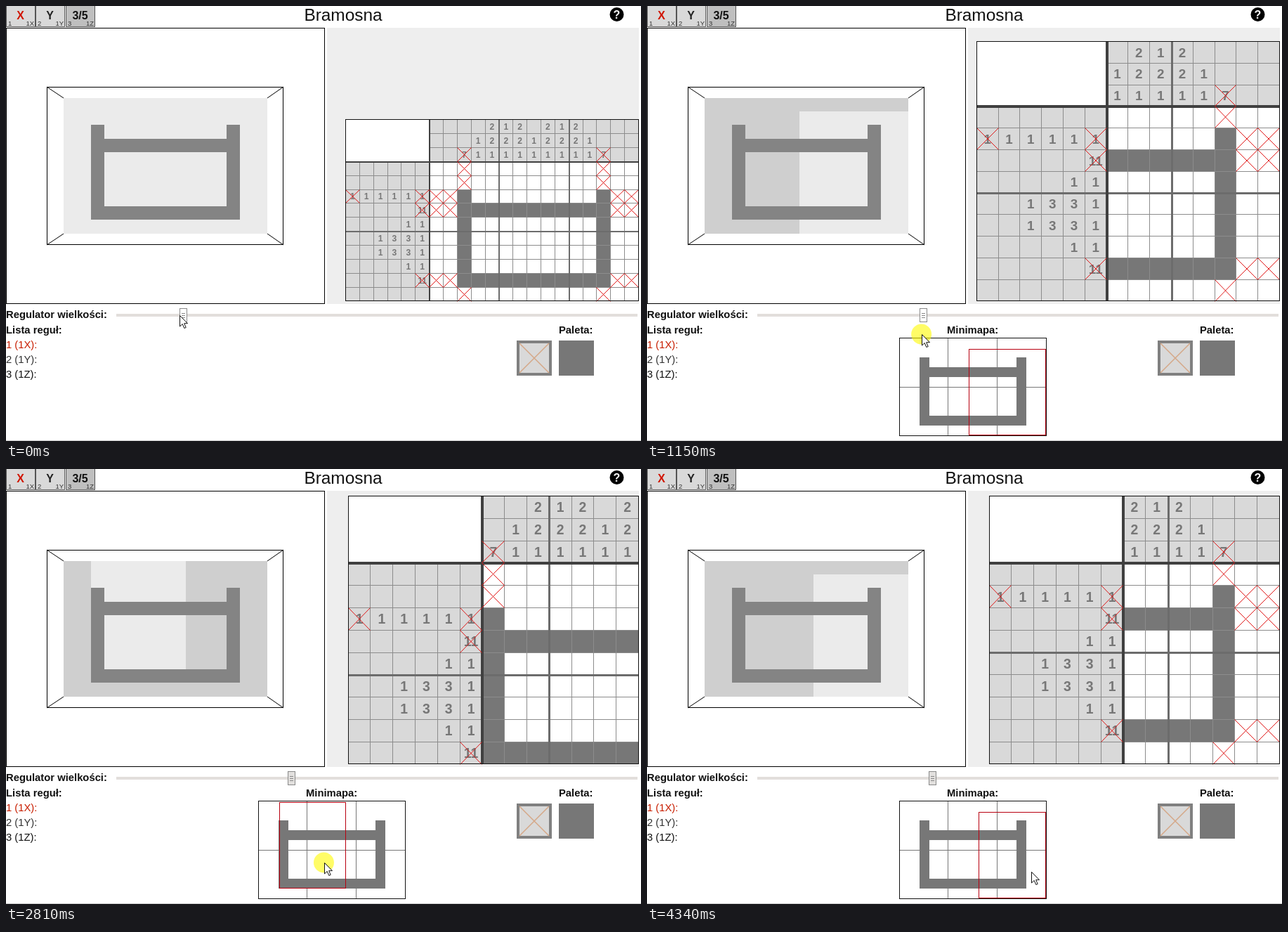
Write an HTML page with a canvas that moves like this. It is 904 by 619 pixels and loops after 4390 ms.

```html
<!DOCTYPE html>
<html lang="pl">
<head>
<meta charset="utf-8">
<title>Nonogram</title>
<style>
html, body { margin: 0; width: 100%; height: 100%; overflow: hidden; background: #fff; }
canvas { display: block; }
</style>
</head>
<body>
<canvas id="stage" width="904" height="619"></canvas>
<script>
const ctx = document.getElementById('stage').getContext('2d');
const LOOP = 4390, COLS = 15, ROWS = 10, SIDE = 6, HEAD = 3;
const RIGHT = 900.5, BOTTOM = 420;
const INK = '#777', CLUE = '#d9d9d9', RED = '#e01818', SIZE = 14.8;

const rowClues = ['', '', '1 1 1 1 1 1', '11', '1 1', '1 3 3 1', '1 3 3 1', '1 1', '11', '']
  .map(s => s ? s.split(' ') : []);
const colClues = ['', '', '7', '11', '221', '121', '221', '11', '221', '121', '221', '11', '7', '', '']
  .map(s => [...s]);

// time, pointer x, pointer y, slider thumb x
const path = [
  [0, 247, 440, 252], [90, 247, 440, 252], [600, 303, 447, 304], [840, 343, 455, 341.5],
  [1150, 391, 467, 393], [1240, 404, 471, 406], [1690, 552, 575, 406], [1870, 552, 575, 406],
  [2250, 514, 567, 406], [2380, 499, 559, 406], [2810, 453, 560, 406], [2940, 447, 560, 406],
  [3120, 434, 565, 406], [3400, 452, 587, 406], [3490, 462, 588, 406], [4060, 530, 575, 406],
  [4200, 547, 573, 406], [LOOP, 547, 573, 406]
];

const clamp = (v, lo, hi) => Math.max(lo, Math.min(hi, v));
const filled = (c, r) => r >= 2 && r <= 8 && c >= 2 && c <= 12 &&
  (c === 2 || c === 12 || r === 3 || r === 8);
const crossed = (c, r) => c === 2 || c === 12 ? r < 2 || r > 8
  : (c < 2 || c > 12) && [2, 3, 8].includes(r);

function poseAt(t) {
  const i = Math.max(1, path.findIndex(k => k[0] > t));
  const a = path[i - 1], b = path[i], f = (t - a[0]) / (b[0] - a[0]);
  return a.slice(1).map((v, j) => v + (b[j + 1] - v) * f);
}

function box(x, y, w, h, fill, edge) {
  if (fill) { ctx.fillStyle = fill; ctx.fillRect(x, y, w, h); }
  if (edge) { ctx.strokeStyle = edge; ctx.lineWidth = 1; ctx.strokeRect(x + .5, y + .5, w - 1, h - 1); }
}

function lines(color, width, ...segments) {
  ctx.strokeStyle = color;
  ctx.lineWidth = width;
  ctx.beginPath();
  for (const [x1, y1, x2, y2] of segments) { ctx.moveTo(x1, y1); ctx.lineTo(x2, y2); }
  ctx.stroke();
}

const cross = (x, y, w, h, color = RED, width = 1) =>
  lines(color, width, [x, y, x + w, y + h], [x + w, y, x, y + h]);

function text(str, x, y, size, color = '#111', weight = '', align = 'left') {
  ctx.font = `${weight} ${size}px "Liberation Sans", Arial, sans-serif`;
  ctx.textAlign = align;
  ctx.fillStyle = color;
  ctx.fillText(str, x, y);
}

const label = (str, x, y) => text(str, x, y, SIZE, '#111', 'bold');

// The solved cells as four bars
function shape(x, y, s, color) {
  const bars = [[2, 2, 1, 7], [12, 2, 1, 7], [2, 3, 11, 1], [2, 8, 11, 1]];
  for (const [c, r, w, h] of bars) {
    const px = Math.round(x + c * s), py = Math.round(y + r * s);
    box(px, py, Math.round(x + (c + w) * s) - px, Math.round(y + (r + h) * s) - py, color);
  }
}

function tab(x, w, name, n, code, color, fill) {
  box(x, -1, w, 31, fill, '#555');
  text(name, x + w / 2 - .5, 19, 16, color, 'bold', 'center');
  text(n, x + 3, 28, 9.5, '#333');
  text(code, x + w - 2, 28, 9.5, '#333', '', 'right');
}

function page() {
  box(0, 0, 904, 619, '#fff');
  tab(0, 42, 'X', '1', '1X', '#d01400', CLUE);
  tab(42, 42, 'Y', '2', '1Y', '#222', CLUE);
  tab(85, 42, '3/5', '3', '1Z', '#111', '#bfbfbf');
  text('Bramosna', 480, 21, 24.4, '#111', '', 'center');
  ctx.fillStyle = '#000';
  ctx.beginPath();
  ctx.arc(869.5, 12, 10, 0, 7);
  ctx.fill();
  text('?', 869.5, 18, 16, '#fff', 'bold', 'center');

  box(457, 31, 444, 393, '#eee');
  box(0, 31, 454, 393, '#fff', '#000');
  label('Regulator wielkości:', 0, 444);
  label('Lista reguł:', 0, 466);
  text('1 (1X):', 0, 487, SIZE, '#c81e00');
  text('2 (1Y):', 0, 508, SIZE, '#333');
  text('3 (1Z):', 0, 529, SIZE, '#111');
  label('Paleta:', 787, 466);
  box(727, 476, 50, 50, '#808080');
  box(731, 480, 42, 42, CLUE);
  cross(731, 480, 42, 42, '#d5a888', 1.5);
  box(787, 476, 50, 50, INK);
  box(157, 438, 742, 4, '#e2dedb');
  box(0, 618, 904, 1, '#ccc');
}

function preview(v) {
  const x = 82.3, y = 130.7, s = 19.3, at = (o, n) => Math.round(o + n * s);
  const area = (c, r, w, h, color) =>
    box(at(x, c), at(y, r), at(x, c + w) - at(x, c), at(y, r + h) - at(y, r), color);
  box(58, 115, 337, 225, null, '#000');
  lines('#000', 1, [58, 115, 82, 131], [395, 115, 372, 131], [58, 340, 82, 324], [395, 340, 372, 324]);
  area(0, 0, COLS, ROWS, '#cfcfcf');
  area(v.col, v.row, v.cols, v.rows, '#ebebeb');
  shape(x, y, s, '#848484');
}

function board(v, s) {
  const nx = SIDE + v.cols, ny = HEAD + v.rows;
  const px = i => RIGHT - (nx - i) * s, py = j => BOTTOM - (ny - j) * s;
  const gx = i => Math.floor(px(i)), gy = j => Math.floor(py(j));
  const x0 = gx(0), y0 = gy(0), w = 901 - x0, h = 420 - y0;
  const cell = (i, j, fn) => fn(gx(i), gy(j), gx(i + 1) - gx(i), gy(j + 1) - gy(j));
  const marks = [];
  const clue = (i, j, str, done) => {
    text(str, px(i + .5), py(j + .5) + s * .22, s * .61, INK, 'bold', 'center');
    if (done) marks.push([i, j]);
  };

  box(x0, y0, w, h, CLUE);
  box(gx(SIDE), gy(HEAD), 901 - gx(SIDE), 420 - gy(HEAD), '#fff');
  for (let c = 0; c < v.cols; c++)
    for (let r = 0; r < v.rows; r++) {
      const i = c + SIDE, j = r + HEAD, C = c + v.col, R = r + v.row;
      if (filled(C, R)) cell(i, j, (x, y, cw, ch) => box(x, y, cw, ch, INK));
      if (crossed(C, R)) marks.push([i, j]);
    }

  const grid = [];
  for (let i = 1; i < nx; i++) grid.push([gx(i) + .5, y0, gx(i) + .5, 420]);
  for (let j = 1; j < ny; j++) grid.push([x0, gy(j) + .5, 901, gy(j) + .5]);
  lines('#8c8c8c', 1, ...grid);

  const mid = Math.round(s * .095), wide = Math.round(s * .12);
  const edge = (p, t) => Math.round(p + .5 - t / 2);
  const upright = (i, t, color) => box(edge(px(i), t), y0, t, h, color);
  const level = (j, t, color) => box(x0, edge(py(j), t), w, t, color);
  for (let c = 1; c < v.cols; c++) if ((c + v.col) % 5 === 0) upright(SIDE + c, mid, '#6c6c6c');
  for (let r = 1; r < v.rows; r++) if ((r + v.row) % 5 === 0) level(HEAD + r, mid, '#6c6c6c');
  upright(SIDE, wide, '#404040');
  level(HEAD, wide, '#404040');

  for (let c = 0; c < v.cols; c++) {
    const list = colClues[c + v.col];
    list.forEach((n, k) => clue(SIDE + c, HEAD - list.length + k, n, n === '7'));
  }
  for (let r = 0; r < v.rows; r++) {
    const list = rowClues[r + v.row];
    list.forEach((n, k) => clue(SIDE - list.length + k, HEAD + r, n,
      n === '11' || list.length === SIDE && (k === 0 || k === SIDE - 1)));
  }
  for (const [i, j] of marks) cell(i, j, (x, y, cw, ch) => cross(x + .5, y + .5, cw, ch));

  box(x0, y0, edge(px(SIDE), wide) - x0, edge(py(HEAD), wide) - y0, '#fff');
  box(x0, y0, w, h, null, '#111');
}

function minimap(v) {
  const x = 360, y = 472.5, s = 13.87;
  label('Minimapa:', 427, 466);
  box(359, 472, 210, 140, '#fff');
  lines('#777', 1, [428.5, 472, 428.5, 612], [498.5, 472, 498.5, 612], [359, 542.5, 569, 542.5]);
  shape(x, y, s, INK);
  box(359, 472, 210, 140, null, '#111');
  const left = Math.round(x + v.col * s + 1), top = Math.round(y + v.row * s + 1.3);
  box(left, top, Math.floor(x + (v.col + v.cols) * s) - left,
    Math.floor(y + (v.row + v.rows) * s) - top, null, '#b80010');
}

function thumb(x, held) {
  const left = Math.round(x) - 5;
  box(left, 430, 11, 20, held ? '#fff' : '#e2e0de', '#8a8a8a');
  for (const y of [437, 440, 443]) box(left + 3, y, 5, 1, '#888');
}

function pointer(x, y, held) {
  if (held) {
    ctx.fillStyle = 'rgba(255,250,0,.6)';
    ctx.beginPath();
    ctx.arc(x - .5, y, 14.5, 0, 7);
    ctx.fill();
  }
  ctx.save();
  ctx.translate(Math.round(x) + .5, Math.round(y) + .5);
  const arrow = new Path2D('M0 0V15.5L3.7 12L6.3 18L8.7 17L6.2 11.2H11Z');
  ctx.fillStyle = '#fff';
  ctx.fill(arrow);
  ctx.strokeStyle = '#111';
  ctx.lineWidth = 1;
  ctx.stroke(arrow);
  ctx.restore();
}

function draw(t) {
  const [x, y, knob] = poseAt(t);
  const s = 19.86 + (knob - 252) * .0775;
  const cols = Math.min(COLS, Math.floor(442 / s) - SIDE);
  const rows = Math.min(ROWS, Math.floor(389 / s) - HEAD);
  const v = { cols, rows, col: COLS - cols, row: ROWS - rows };
  if (t >= 1870) {
    v.col = clamp(Math.round((x - 360) / 13.87 - 5.17), 0, v.col);
    v.row = clamp(Math.round((y - 472.5) / 13.87 - 6.05), 0, v.row);
  }
  const sliding = t < 1290;
  page();
  preview(v);
  board(v, s);
  if (cols < COLS || rows < ROWS) minimap(v);
  thumb(knob, sliding);
  pointer(x, y, t >= 90 && sliding || t >= 1870 && t < 4250);
}

const start = performance.now();
function tick() {
  draw((performance.now() - start) % LOOP);
  requestAnimationFrame(tick);
}
tick();
</script>
</body>
</html>
```
